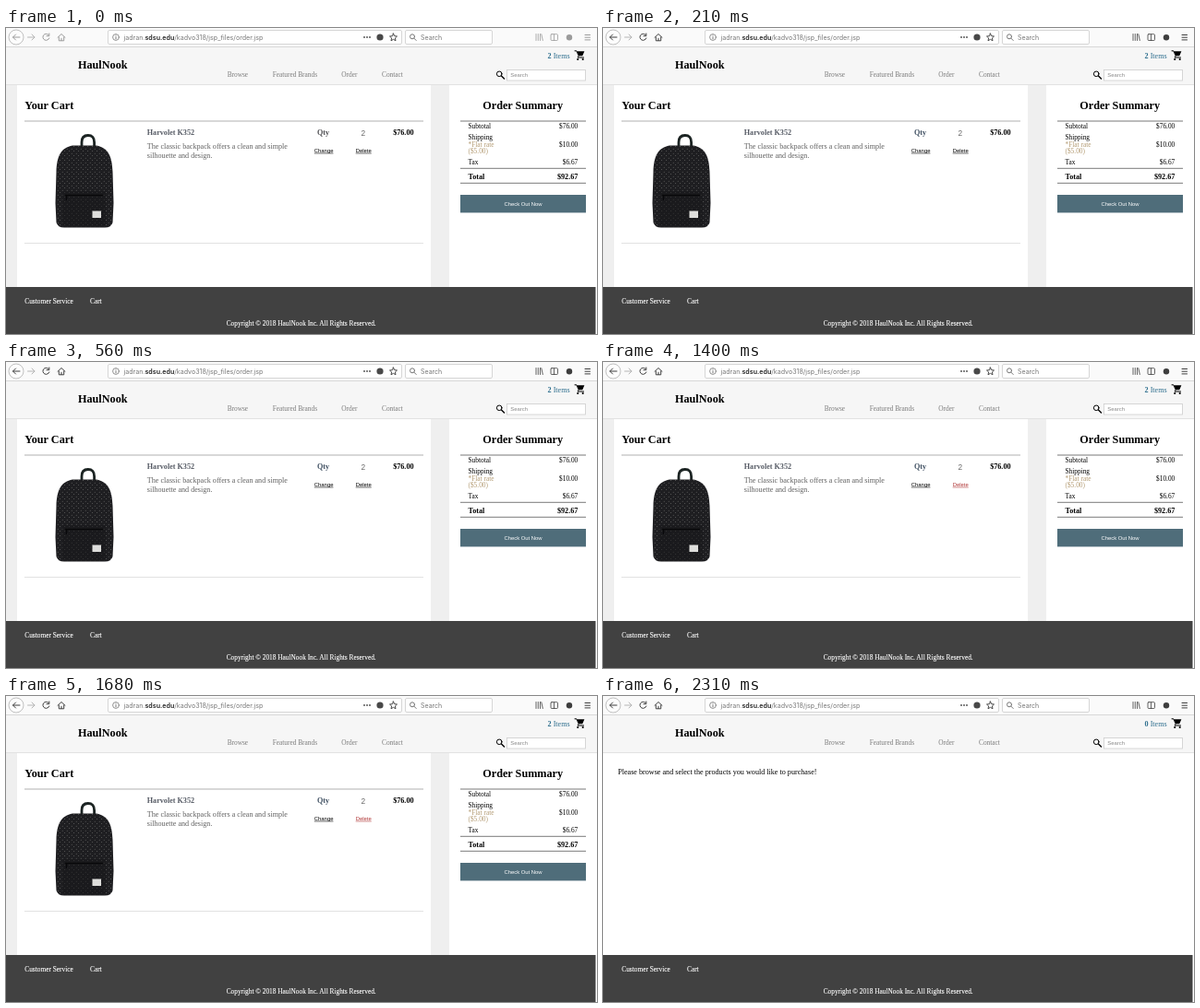
Write an HTML page that moves like this. It is 640 by 332 pixels and loops after 3850 ms.

```html
<!DOCTYPE html>
<html lang="en">
<head>
<meta charset="utf-8">
<title>Shopping cart</title>
<style>
html, body { margin: 0; width: 100%; height: 100%; overflow: hidden; background: #fff; }
svg { display: block; width: 640px; height: 332px; }
text { font-family: "Liberation Serif", Times, serif; font-size: 7.35px; white-space: pre; }
.ui { font-family: Inter, "Liberation Sans", sans-serif; }
.sans { font-family: "Liberation Sans", Arial, sans-serif; font-size: 5.9px; }
.title { font-size: 12.2px; font-weight: bold; }
.body { font-size: 8.15px; }
.bold { font-weight: bold; }
.end { text-anchor: end; }
.mid { text-anchor: middle; }
.link { text-decoration: underline; text-decoration-thickness: .5px; }
.line { fill: none; stroke: currentColor; stroke-width: 1; stroke-linecap: round; stroke-linejoin: round; }
.thin { stroke-width: .8; }
.field { fill: #fff; stroke: #ccc; stroke-width: .8; }
</style>
</head>
<body>
<svg viewBox="0 0 640 332" xmlns="http://www.w3.org/2000/svg">
  <defs>
    <pattern id="dots" width="5" height="5" patternUnits="userSpaceOnUse">
      <circle cx="1.2" cy="1.2" r=".42" fill="#a2a29f"/>
      <circle cx="3.7" cy="3.7" r=".42" fill="#a2a29f"/>
    </pattern>
    <path id="bag" d="M54.5 156C55 138 60 130 72 127.5H98C110 130 115 138 115.5 156L116.5 190L115.5 211Q114 216.5 107 216.5H63Q56 216.5 54.5 211L53.5 190Z"/>
  </defs>
  <rect width="640" height="332" fill="#fff"/>

  <!-- Browser toolbar -->
  <rect width="640" height="20" fill="#fafafa"/>
  <rect y="20" width="640" height="1" fill="#d8d8d8"/>
  <rect class="field" x="110.5" y="2.5" width="318" height="15" rx="1.5"/>
  <rect class="field" x="432.5" y="2.5" width="94" height="15" rx="1.5"/>
  <circle cx="11" cy="10" r="8" fill="#fdfdfd" stroke="#b0b0b0" stroke-width=".8"/>
  <g id="buttons">
    <path class="line" d="M15 10H7.5M10.5 7L7.5 10L10.5 13"/>
    <path class="line" d="M46 7.4A3.5 3.5 0 1 0 46.8 11M46.8 6V8.7H44"/>
    <path class="line" d="M56 10.3L60 6.5L64 10.3M57.3 10V13.8H62.7V10M60 13.5V11.3"/>
    <path class="line thin" d="M574 6.5V13.5M576.3 6.5V13.5M578.5 6.5V13.5M579.8 6.7L581.3 13.5"/>
    <rect class="line thin" x="590" y="6.7" width="7.5" height="6.8" rx="1"/>
    <path class="line thin" d="M593.5 7V13.5"/>
    <circle cx="610" cy="10.2" r="3.2" fill="currentColor"/>
    <path class="line" d="M627 7.5H632.5M627 10.2H632.5M627 12.9H632.5"/>
  </g>
  <g color="#484848" fill="currentColor">
    <circle cx="388" cy="10" r=".9"/><circle cx="391" cy="10" r=".9"/><circle cx="394" cy="10" r=".9"/>
    <circle cx="405" cy="10" r="3.6"/>
    <path class="line" d="M419.5 6L420.7 8.7L423.5 9L421.4 10.9L422 13.8L419.5 12.3L417 13.8L417.6 10.9L415.5 9L418.3 8.7Z"/>
  </g>
  <path class="line" color="#b5b5b5" d="M23.5 10H31M28 7L31 10L28 13"/>
  <g color="#777">
    <circle class="line thin" cx="119" cy="10" r="3.4"/>
    <path class="line" d="M119 9.7V11.8M119 8V8.1"/>
    <circle class="line" cx="440" cy="9.3" r="2.5"/>
    <path class="line" d="M442 11.3L444.2 13.5"/>
  </g>
  <text class="ui" x="127.5" y="12.8" fill="#777" style="font-size:7.1px">jadran.<tspan fill="#222" font-weight="600">sdsu.edu</tspan>/kadvo318/jsp_files/order.jsp</text>
  <text class="ui" x="449" y="12.8" fill="#777" style="font-size:7px">Search</text>

  <!-- Site header -->
  <rect y="21" width="640" height="40" fill="#f6f6f6"/>
  <rect y="61" width="640" height="1" fill="#e2e2e2"/>
  <text class="title" x="78" y="44">HaulNook</text>
  <g fill="#7c7c7c">
    <text x="239.7" y="53">Browse</text>
    <text x="288.7" y="53">Featured Brands</text>
    <text x="363.3" y="53">Order</text>
    <text x="407" y="53">Contact</text>
  </g>
  <text class="body end" x="610.7" y="33" fill="#30708f"><tspan id="count" class="bold">2</tspan> Items</text>
  <g color="#000">
    <path class="line" d="M616 24.8H617.8L620.2 30.2L619 32H625.6"/>
    <path d="M618.3 25.3H626.4L624.2 30.3H620.4Z"/>
    <circle cx="619.2" cy="34" r="1.1"/><circle cx="624.7" cy="34" r="1.1"/>
    <circle class="line" cx="534.2" cy="49.8" r="2.8"/>
    <path class="line" style="stroke-width:1.4" d="M536.5 52L539.5 55"/>
  </g>
  <rect class="field" x="542.5" y="45.5" width="85" height="11.5"/>
  <text class="sans" x="546.3" y="53.3" fill="#888">Search</text>

  <!-- Filled cart -->
  <g id="cart">
    <rect y="62" width="640" height="219" fill="#efefef"/>
    <rect x="12" y="62" width="448" height="219" fill="#fff"/>
    <rect x="480" y="62" width="160" height="219" fill="#fff"/>
    <text class="title" x="20.3" y="88">Your Cart</text>
    <path d="M20 101H452" stroke="#a8a8a8" stroke-width=".9"/>
    <path d="M20 233.5H452" stroke="#e2e2e2"/>

    <path d="M82 130V124Q82 116.5 88.8 116.5T95.6 124V130" fill="none" stroke="#1c2423" stroke-width="2.8"/>
    <use href="#bag" fill="#1e1e21"/>
    <use href="#bag" fill="url(#dots)"/>
    <path d="M61 177H108V212Q108 215 104 215H65Q61 215 61 212Z" fill="#18181b" opacity=".55"/>
    <path d="M64 181.5H105M65.5 181.5V187" stroke="#08080a" stroke-width="1.4" fill="none"/>
    <rect x="93.5" y="198.5" width="9.5" height="7.5" fill="#dededc"/>

    <text class="body bold" x="152.8" y="115.5" fill="#555a64">Harvolet K352</text>
    <g fill="#606060">
      <text class="body" x="152.8" y="131">The classic backpack offers a clean and simple</text>
      <text class="body" x="152.8" y="141">silhouette and design.</text>
    </g>
    <text id="qty" class="body bold" x="337" y="115.5">Qty</text>
    <text class="sans" x="384.6" y="116.5" fill="#666" style="font-size:8.3px">2</text>
    <text class="body bold end" x="441.5" y="115.5">$76.00</text>
    <text class="sans link" x="333.8" y="134.7">Change</text>
    <text id="delete" class="sans link" x="378.7" y="134.7">Delete</text>

    <text class="title mid" x="559.7" y="88">Order Summary</text>
    <path d="M492 101H628M492 152.3H628M492 168.3H628" stroke="#6a6a6a" stroke-width=".9"/>
    <text x="500.5" y="109">Subtotal</text>
    <text class="end" x="619.3" y="109">$76.00</text>
    <text x="500.5" y="120.5">Shipping</text>
    <g fill="#b39a72">
      <text x="500.5" y="128.9">*Flat rate</text>
      <text x="500.5" y="136">($5.00)</text>
    </g>
    <text class="end" x="619.3" y="128.6">$10.00</text>
    <text x="500.5" y="147.8">Tax</text>
    <text class="end" x="619.3" y="147.8">$6.67</text>
    <text class="body bold" x="500.5" y="163.6">Total</text>
    <text class="body bold end" x="619.3" y="163.6">$92.67</text>
    <rect x="492" y="181" width="136" height="19.4" fill="#4f6d7a"/>
    <text class="sans mid" x="560" y="193" fill="#fff">Check Out Now</text>
  </g>

  <text id="empty" class="body" x="16.2" y="85">Please browse and select the products you would like to purchase!</text>

  <!-- Footer -->
  <rect y="281" width="638.5" height="51" fill="#414141"/>
  <g fill="#fff" stroke="#fff" stroke-width=".12">
    <text x="20.3" y="299">Customer Service</text>
    <text x="91" y="299">Cart</text>
    <text class="mid" x="319.7" y="323">Copyright © 2018 HaulNook Inc. All Rights Reserved.</text>
  </g>
</svg>
<script>
const LOOP = 3850, TICK = 70, EMPTIED = 2310;
const el = id => document.getElementById(id);
const [buttons, count, cart, qty, remove, empty] =
  ["buttons", "count", "cart", "qty", "delete", "empty"].map(el);

const mix = (from, to, p) =>
  `rgb(${from.map((c, i) => Math.round(c + (to[i] - c) * p))})`;

// Progress advances once per tick, reaching 1 at `end`.
const steps = (t, start, end) => {
  const tick = Math.floor(t / TICK) * TICK;
  return Math.min(1, Math.max(0, (tick - start) / (end - start)));
};

function render(t) {
  const focus = steps(t, 0, 210);
  const hover = steps(t, 1120, 1400);
  const emptied = t >= EMPTIED;
  buttons.style.color = mix([155, 155, 155], [62, 62, 62], focus);
  qty.style.fill = mix([80, 80, 84], [66, 82, 100], focus);
  remove.style.fill = mix([0, 0, 0], [176, 54, 54], hover * hover);
  cart.style.display = emptied ? "none" : "";
  empty.style.display = emptied ? "" : "none";
  count.textContent = emptied ? "0" : "2";
}

const start = performance.now();
function frame() {
  render((performance.now() - start) % LOOP);
  requestAnimationFrame(frame);
}
render(0);
requestAnimationFrame(frame);
</script>
</body>
</html>
```
